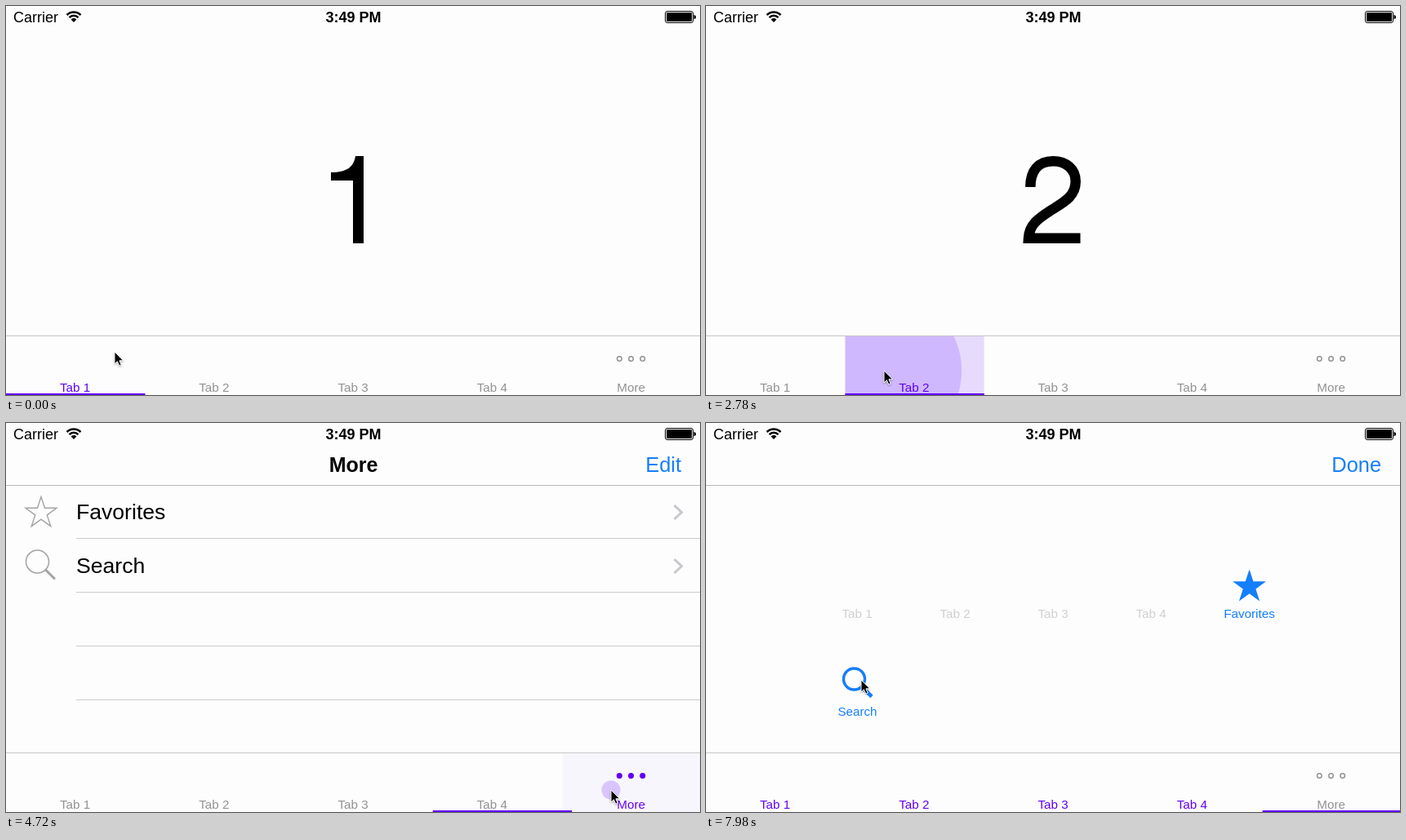
An HTML page for the animation above (8 s loop, 850x477 px).

```html
<!DOCTYPE html>
<html lang="en">
<head>
<meta charset="utf-8">
<title>Paper tab bar</title>
<style>
  html, body { margin: 0; width: 100%; height: 100%; overflow: hidden; background: #fdfdfd; }
  svg { display: block; }
  text { font-family: "Liberation Sans", Arial, sans-serif; }
  .mid { text-anchor: middle; }
  .end { text-anchor: end; }
  .tab { font-size: 15.2px; text-anchor: middle; }
  .status { font-size: 18px; }
  .nav { font-size: 25.4px; }
  .row { font-size: 26.6px; }
  .bold { font-weight: bold; }
  .title { font-size: 25px; }
  .blue { fill: #157efb; }
</style>
</head>
<body>
<svg id="stage" width="100%" height="100%" viewBox="0 0 850 477"></svg>
<script>
const LOOP = 8000, PURPLE = '#6200f5', RIPPLE = '#5600ff', GRAY = '#929292', BLUE = '#157efb', PAPER = '#fdfdfd';
const TAB_W = 170.4, BAR_Y = 404;
const tabNames = ['Tab 1', 'Tab 2', 'Tab 3', 'Tab 4', 'More'];
const tabCenter = i => 84.6 + 170.25 * i;

// Touches: tab, touch point, start and release of the ripple.
const ripples = [
  { tab: 0, x: 141, y: 427, down: 930, up: 1710 },
  { tab: 1, x: 218, y: 447, down: 2210, up: 2720 },
  { tab: 3, x: 602, y: 452, down: 3500, up: 4130 },
  { tab: 4, x: 741, y: 450, down: 4700, up: 4790 },
];
// Tab selections: time and tab.
const selections = [[0, 0], [2150, 1], [3440, 3], [4710, 4]];
const EDIT_AT = 6780;

const cursorPath = [
  [860, 133, 424], [1230, 153, 428], [1860, 153, 428], [2150, 218, 447], [2800, 218, 447],
  [3440, 607, 450], [3600, 601, 451], [4180, 601, 451], [4510, 741, 450], [5310, 741, 450],
  [5470, 321, 140], [5920, 321, 140], [6080, 650, 62], [6240, 650, 62], [6430, 803, 56],
  [7060, 803, 56], [7450, 359, 328], [7610, 359, 328], [7780, 262, 296], [7970, 190, 315],
];
const editOpacity = [[6440, 1], [6560, 0.2], [6770, 0.2], [7120, 1]];

const clamp = v => Math.max(0, Math.min(1, v));
const easeOut = p => 1 - (1 - p) ** 2;
const smooth = p => p * p * (3 - 2 * p);

function keyed(keys, t) {
  const next = keys.findIndex(k => k[0] > t);
  if (next < 0) return keys[keys.length - 1].slice(1);
  if (next === 0) return keys[0].slice(1);
  const a = keys[next - 1], b = keys[next];
  const p = smooth((t - a[0]) / (b[0] - a[0]));
  return a.slice(1).map((v, i) => v + (b[i + 1] - v) * p);
}

const text = (x, y, cls, content, extra = '') =>
  `<text x="${x}" y="${y}" class="${cls}" ${extra}>${content}</text>`;
const line = (x, y, color) => `<rect x="${x}" y="${y}" width="${850 - x}" height="1" fill="${color}"/>`;

function star(cx, cy, radius, attrs) {
  const points = Array.from({ length: 10 }, (_, i) => {
    const r = i % 2 ? radius * 0.382 : radius, a = Math.PI * (i / 5 - 0.5);
    return `${(cx + r * Math.cos(a)).toFixed(2)},${(cy + r * Math.sin(a)).toFixed(2)}`;
  });
  return `<polygon points="${points.join(' ')}" ${attrs}/>`;
}

const magnifier = (cx, cy, r, ring, handle, color) =>
  `<g fill="none" stroke="${color}"><circle cx="${cx}" cy="${cy}" r="${r}" stroke-width="${ring}"/>
   <path d="M${cx + 10} ${cy + 10}l11.5 11.5" stroke-width="${handle}"/></g>`;

const wifiArc = r => {
  const d = r * Math.SQRT1_2;
  return `<path d="M${83 - d} ${19.5 - d}A${r} ${r} 0 0 1 ${83 + d} ${19.5 - d}"/>`;
};

const statusBar = `
  ${text(9, 20, 'status', 'Carrier')}
  <g fill="none" stroke="#000" stroke-width="2.6">${wifiArc(12)}${wifiArc(7.7)}</g>
  <path d="M83 20l-3.4-3.6a4.8 4.8 0 0 1 6.8 0z"/>
  ${text(425.5, 20, 'status bold mid', '3:49 PM')}
  <rect x="807.5" y="6.5" width="34" height="14" rx="2.5" fill="none" stroke="#000"/>
  <rect x="809" y="8" width="31" height="11" rx="1"/>
  <path d="M842.5 11a2.5 2.5 0 0 1 0 5z"/>`;

// Large page numerals, one per tab page.
const numerals = `
  <path class="numeral" data-tab="0" d="M438 184V291H425V214H398V204C418 204 426 197 428 184Z"/>
  <path class="numeral" data-tab="1" fill="none" stroke="#000" stroke-width="12.5"
    d="M397.3 222C397.3 201 408 190.2 425 190.2C441 190.2 452.7 200 452.7 215C452.7 232 441 239 425 249C408 260 396 267 395 284.8H458.5"/>
  <path class="numeral" data-tab="3" fill-rule="evenodd"
    d="M448 184V254H462V266H448V291H436V266H389V253L437 184ZM436 203L400 254H436Z"/>`;

const chevron = y => `<path d="M818.5 ${y - 8}l9 8.5-9 8.5" fill="none" stroke="#c7c7cc" stroke-width="3"/>`;

const moreList = `
  <rect y="30" width="850" height="374" fill="${PAPER}"/>
  ${line(0, 76, '#b8b8b8')}
  ${text(425.5, 60, 'title bold mid', 'More')}
  ${text(827, 60, 'nav blue end', 'Edit', 'id="edit"')}
  ${[141, 207, 273, 339].map(y => line(86, y, '#cbcbcd')).join('')}
  ${star(43, 110.5, 20, 'fill="none" stroke="#a3a3a3" stroke-width="1.4"')}
  ${magnifier(38.5, 170, 14, 1.5, 3, '#a3a3a3')}
  ${text(86, 118, 'row', 'Favorites')}${text(86, 184, 'row', 'Search')}
  ${chevron(109)}${chevron(175)}`;

const editSheet = `
  <rect y="30" width="850" height="447" fill="${PAPER}"/>
  ${line(0, 76, '#b8b8b8')}
  ${text(827, 60, 'nav blue end', 'Done')}
  ${tabNames.slice(0, 4).map((name, i) => text(185 + 120 * i, 239, 'tab', name, 'fill="#d0d0d0"')).join('')}
  ${star(665.5, 201, 21.5, `fill="${BLUE}"`)}${text(665.5, 239, 'tab blue', 'Favorites')}
  ${magnifier(181.5, 314, 13, 3.4, 4.6, BLUE)}${text(185.5, 359, 'tab blue', 'Search')}`;

const rippleMarkup = ripples.map(({ tab, x, y }) => {
  const left = tab * TAB_W;
  return `<svg class="ripple" x="${left}" y="405" width="${TAB_W}" height="72" viewBox="${left} 405 ${TAB_W} 72">
    <rect x="${left}" y="405" width="${TAB_W}" height="72" fill="${RIPPLE}"/>
    <circle cx="${x}" cy="${y}" fill="${RIPPLE}"/></svg>`;
}).join('');

const stage = document.getElementById('stage');
stage.innerHTML = `
  <rect width="850" height="477" fill="${PAPER}"/>
  ${numerals}
  <g id="list">${moreList}</g>
  <g id="sheet">${editSheet}</g>
  ${statusBar}
  <rect y="${BAR_Y}" width="850" height="73" fill="${PAPER}"/>
  ${rippleMarkup}
  ${line(0, BAR_Y, '#c6c6c6')}
  ${tabNames.map((name, i) => text(tabCenter(i), 473, 'tab label', name)).join('')}
  <g id="dots" stroke-width="1.5">
    ${[751.3, 765.5, 779.7].map(x => `<circle cx="${x}" cy="432.6" r="2.8"/>`).join('')}</g>
  <rect id="underline" y="475" width="${TAB_W}" height="2" fill="${PURPLE}"/>
  <path id="cursor" d="M0 0V15L3.4 11.8 5.8 17.2 8.2 16.1 5.9 10.8H10.6Z" stroke="#fff" stroke-width="1"
    style="filter:drop-shadow(0 1px 1px rgba(0,0,0,.35))"/>`;

const el = Object.fromEntries([...stage.querySelectorAll('[id]')].map(node => [node.id, node]));
const labels = [...stage.querySelectorAll('.label')];
const numeralNodes = [...stage.querySelectorAll('.numeral')];
const rippleNodes = [...stage.querySelectorAll('.ripple')];
const show = (node, visible) => node.setAttribute('display', visible ? 'inline' : 'none');

function drawRipple(node, { down, up }, t) {
  const grow = easeOut(clamp((t - down) / 290));
  const released = Math.max(0, t - up);
  const [back, circle] = node.children;
  show(node, t > down && released < 300);
  back.setAttribute('opacity', 0.2 * grow * clamp(1 - released / 180));
  circle.setAttribute('opacity', 0.2 * clamp(1 - released / 300));
  circle.setAttribute('r', 83 * grow + 0.2 * released);
}

function draw(t) {
  const index = selections.filter(([at]) => at <= t).length - 1;
  const [since, tab] = selections[index];
  const previous = index ? selections[index - 1][1] : tab;
  const editing = t >= EDIT_AT;

  numeralNodes.forEach(node => show(node, Number(node.dataset.tab) === tab));
  show(el.list, tab === 4);
  show(el.sheet, editing);
  el.edit.setAttribute('opacity', keyed(editOpacity, t)[0]);

  // Critically damped spring brings the sheet up.
  const spring = 0.0161 * (t - EDIT_AT);
  el.sheet.setAttribute('transform', `translate(0 ${Math.round(447 * (1 + spring) * Math.exp(-spring))})`);

  labels.forEach((label, i) =>
    label.setAttribute('fill', (editing ? i < 4 : i === tab) ? PURPLE : GRAY));
  const moreActive = tab === 4 && !editing;
  el.dots.setAttribute('fill', moreActive ? PURPLE : 'none');
  el.dots.setAttribute('stroke', moreActive ? PURPLE : GRAY);

  const slide = easeOut(clamp((t - since) / 320));
  el.underline.setAttribute('x', TAB_W * (previous + (tab - previous) * slide));
  rippleNodes.forEach((node, i) => drawRipple(node, ripples[i], t));
  el.cursor.setAttribute('transform', `translate(${keyed(cursorPath, t).join(' ')})`);
}

const start = performance.now();
function tick() {
  draw((performance.now() - start) % LOOP);
  requestAnimationFrame(tick);
}
tick();
</script>
</body>
</html>
```
